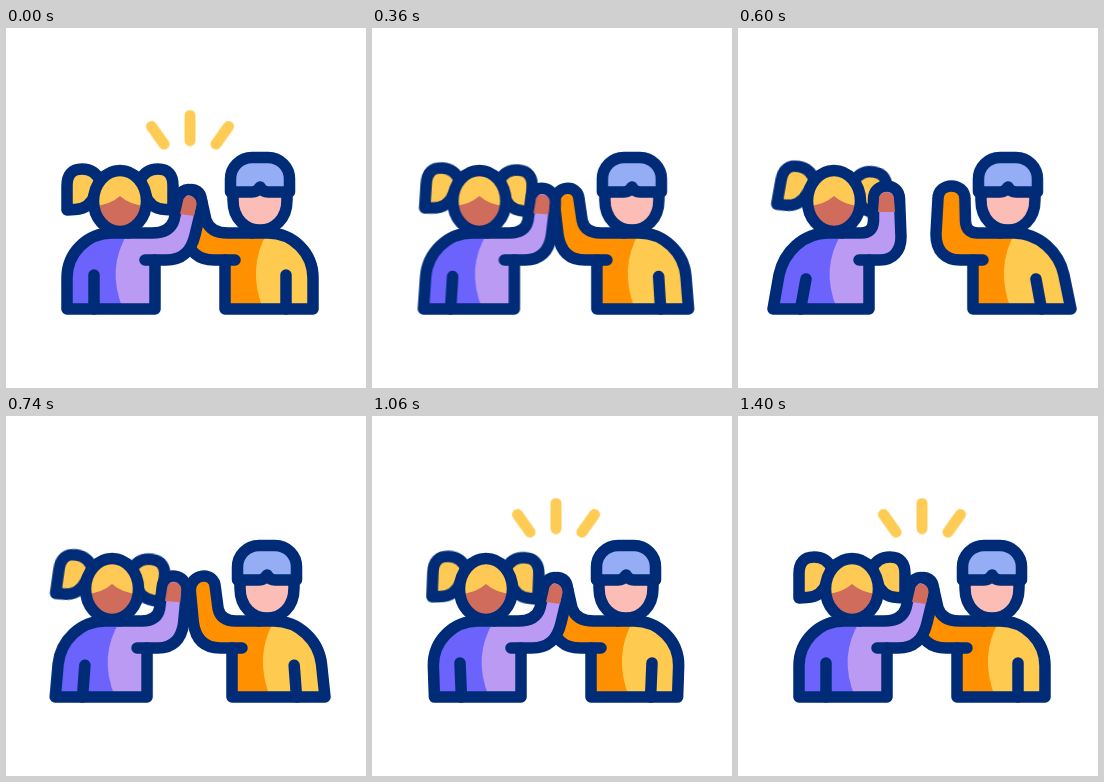
An HTML page for the animation above (1600 ms loop, 360 by 360 pixels).

```html
<!DOCTYPE html>
<html lang="en">
<head>
<meta charset="utf-8">
<title>High five</title>
<style>
  html, body { margin: 0; width: 100%; height: 100%; overflow: hidden; background: #fff; }
  svg { display: block; width: 100vw; height: 100vh; }
  path, ellipse { fill: none; stroke-linecap: round; stroke-linejoin: round; }
  .line { stroke: #002b76; stroke-width: 11.5; }

  .figure, .arm, .hand, .back, .pit, .tail, .ray { animation: 1600ms linear infinite; }

  .girl {
    --dx: -18px; --outer: #6c63fc; --inner: #bb9af3;
    --open: path("M122 205L141 205Q153 205 153.5 193L153.5 171C153.5 153.5 179.5 153.5 179.5 171L181 209C181 223 173 232 160 232L139 232");
    --lean: path("M149 232L149 281L53 281L59 247C64 224 83 205 108 205L122 205");
  }
  .boy {
    --dx: -16px; --outer: #fecb50; --inner: #ff9100;
    --open: path("M122 205L144 205Q156 205 156.5 193L157 171C157 153.5 184 153.5 184 171L186 206C186 223 177 232 162 232L139 232");
    --lean: path("M149 232L149 281L51 281L58 247C63 224 83 205 108 205L122 205");
  }

  .figure { animation-name: slide; }
  .arm { fill: var(--inner); animation-name: arm; }
  .hand { fill: #cf6c5c; animation-name: hand; }
  .back { animation-name: back; }
  .back.fill { fill: var(--outer); }
  .split { fill: var(--inner); }
  .pit { animation-name: pit; }
  .tail { animation-name: swing; }
  .tail.l { transform-origin: 92px 155px; }
  .tail.r { transform-origin: 136px 155px; }
  .hair { fill: #fec955; }
  .skin { fill: #cf6c5c; }
  .face { fill: #fdbdb7; }
  .cap { fill: #94adf5; }
  .ray { --full: path("M0 0V21.5"); stroke: #fecb55; stroke-width: 11; animation-name: ray; }
  .ray.mid { --full: path("M0 0V25"); }

  @keyframes slide {
    0%, 4.4% { transform: none; animation-timing-function: ease-in; }
    37.5% { transform: translateX(var(--dx)); animation-timing-function: ease-in-out; }
    54%, 100% { transform: none; }
  }
  @keyframes arm {
    0%, 4.4%, 54%, 100% {
      d: path("M122 205L146 205Q164 205 168 192L172.5 172C174 155 197 160 196 178L189 207C185 224 176 232 160 232L139 232");
      animation-timing-function: ease-in;
    }
    37.5% { d: var(--open); animation-timing-function: ease-in-out; }
  }
  @keyframes hand {
    0%, 4.4%, 54%, 100% {
      d: path("M174 186L177 173C178 165 191 167 190.5 176L188 188Z");
      animation-timing-function: ease-in;
    }
    37.5% {
      d: path("M158 184L159 171C159 162 174 162 174 171L175 184Z");
      animation-timing-function: ease-in-out;
    }
  }
  @keyframes back {
    0%, 4.4%, 82%, 100% {
      d: path("M149 232L149 281L61 281L61 250C61 225 81 205 106 205L122 205");
      animation-timing-function: ease-in;
    }
    37.5% { d: var(--lean); animation-timing-function: ease-in-out; }
    57% {
      d: path("M149 232L149 281L63 281L61.5 250C61 225 81 205 106 205L122 205");
      animation-timing-function: ease-in-out;
    }
  }
  @keyframes pit {
    0%, 4.4%, 82%, 100% { d: path("M88 247L88 281"); animation-timing-function: ease-in; }
    37.5% { d: path("M86 251L80.5 281"); animation-timing-function: ease-in-out; }
    57% { d: path("M88 247L90 281"); animation-timing-function: ease-in-out; }
  }
  @keyframes swing {
    0%, 4.4%, 74%, 100% { transform: none; animation-timing-function: ease-in; }
    37.5% { transform: rotate(10deg); animation-timing-function: ease-in-out; }
    57.5% { transform: rotate(5deg); animation-timing-function: ease-in-out; }
  }
  @keyframes ray {
    0%, 4.4%, 57%, 100% { d: var(--full); opacity: 1; }
    15% { d: path("M0 -8V4"); opacity: .82; }
    17% { d: path("M0 -8.5V-1"); opacity: 0; }
    49.9% { d: path("M0 22V22.1"); opacity: 0; }
    50% { d: path("M0 21.4V21.5"); opacity: 1; }
  }
</style>
</head>
<body>
<svg viewBox="0 0 360 360">
  <path class="ray" d="M0 0V21.5" transform="translate(145.5 98.5) rotate(-35.5)"/>
  <path class="ray mid" d="M0 0V25" transform="translate(184 87.5)"/>
  <path class="ray" d="M0 0V21.5" transform="translate(222.5 98.5) rotate(35.5)"/>

  <!-- Mirrored around x = 184 -->
  <g transform="matrix(-1 0 0 1 368 0)">
    <g class="figure boy">
      <path class="back fill"/>
      <path class="split" d="M107 205Q127 240 111 281H149V232L122 205Z"/>
      <path class="arm line"/>
      <path class="back line"/>
      <path class="pit line"/>
      <path class="face line" d="M87 163V172C87 212 141 212 141 172V163"/>
      <path class="cap line" d="M84.5 164V151A21.5 21.5 0 0 1 106 129.5H122A21.5 21.5 0 0 1 143.5 151V164H122Q117 164 114 159Q111 164 106 164Z"/>
    </g>
  </g>

  <g class="figure girl">
    <path class="tail l hair line" d="M61 182V158Q61 141 76 141Q89 141 94 153L89 166Q84 181 69 181.5Z"/>
    <path class="tail r hair line" d="M167 182V158Q167 141 152 141Q139 141 134 153L139 166Q144 181 159 181.5Z"/>
    <path class="back fill"/>
    <path class="split" d="M122 205Q100 240 117 281H149V232Z"/>
    <path class="arm line"/>
    <path class="hand"/>
    <path class="back line"/>
    <path class="pit line"/>
    <ellipse class="hair" cx="114" cy="173" rx="26.5" ry="30.5"/>
    <path class="skin" d="M88 178Q104 177 114 168Q124 177 140 178C138 212 90 212 88 178Z"/>
    <ellipse class="line" cx="114" cy="173" rx="26.5" ry="30.5"/>
  </g>
</svg>
</body>
</html>
```
